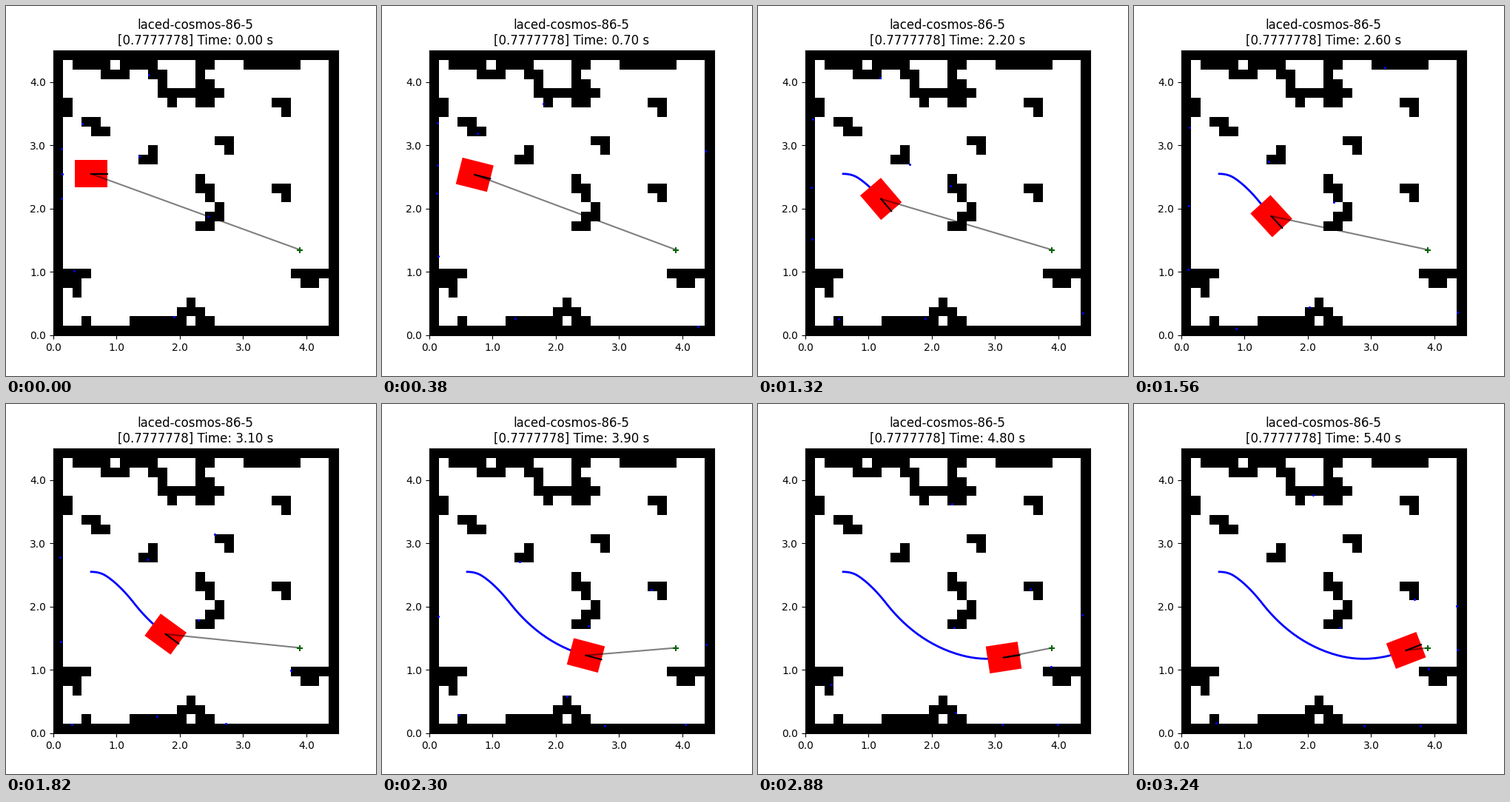
Animation, 500 px wide and 500 px high, one loop 3340 ms. Source, as a matplotlib script:

```python
import numpy as np
import matplotlib.pyplot as plt
from matplotlib.animation import FuncAnimation
from matplotlib.patches import Rectangle

N, CELL = 30, 0.15
SIZE = N * CELL
DT, STEPS = 0.1, 54
TICK, TICKS = 20, 167
START, GOAL = (0.6, 2.55), (3.9, 1.35)
LENGTH, WIDTH = 0.508, 0.43

MOVES = {"R": (1, 0), "L": (-1, 0), "U": (0, 1), "D": (0, -1)}
HOOK = "RD"
# Each obstacle is traced cell by cell from a start column and row
WALKS = [
    (2, 28, "RRRDRRURRRDRDDRRRRRR"), (12, 24, ""),
    (16, 28, "LDDDDRUU"), (20, 28, "RRRRR"),
    (23, 24, HOOK), (17, 20, HOOK), (23, 15, HOOK),
    (1, 24, "D"), (3, 22, "RDR"), (9, 18, "RU"),
    (15, 16, "DRD"), (17, 13, "DLDL"),
    (3, 6, "LLDRD"), (25, 6, "RRRLDL"),
    (3, 1, ""), (8, 1, "RRRRRURUDRDR"),
]


def build_grid():
    grid = np.ones((N, N), bool)
    grid[1:-1, 1:-1] = False
    for col, row, walk in WALKS:
        grid[row, col] = True
        for step in walk:
            dx, dy = MOVES[step]
            col, row = col + dx, row + dy
            grid[row, col] = True
    return grid


def ease(t, start, end):
    """Mostly linear ramp from 0 to 1 with slightly softened ends."""
    u = np.clip((t - start) / (end - start), 0, 1)
    return 0.7 * u + 0.3 * u * u * (3 - 2 * u)


def lag(t, start, tau):
    """First-order response to a step at the start time."""
    return 1 - np.exp(-np.maximum(t - start, 0) / tau)


def drive(sub=20):
    """Integrate speed along the heading and sample once per step."""
    h = DT / sub
    t = np.arange(STEPS * sub + 1) * h
    heading = -52 * ease(t, 0, 2.35) + 73 * ease(t, 2.35, 5.4)
    speed = 0.172 + 0.818 * lag(t, 1.35, 0.5) - 0.268 * lag(t, 3.85, 0.11)
    a = np.radians(heading)

    def integrate(v, origin):
        return origin + np.append(0, np.cumsum((v[1:] + v[:-1]) * h / 2))

    x = integrate(speed * np.cos(a), START[0])
    y = integrate(speed * np.sin(a), START[1])
    return x[::sub], y[::sub], heading[::sub]


grid = build_grid()
xs, ys, headings = drive()
reach = np.arange(0.01, 6.5, 0.05)
beams = np.arange(180, -180, -40)


def scan(x, y, heading):
    """March each beam until it lands in a blocked cell."""
    a = np.radians(heading + beams)[:, None]
    px, py = x + reach * np.cos(a), y + reach * np.sin(a)
    col = np.clip((px / CELL).astype(int), 0, N - 1)
    row = np.clip((py / CELL).astype(int), 0, N - 1)
    hit = grid[row, col].argmax(axis=1)
    i = np.arange(len(beams))
    return px[i, hit], py[i, hit]


fig, ax = plt.subplots(figsize=(5, 5), dpi=100)
ax.imshow(grid, cmap="binary", vmin=0, vmax=1, origin="lower",
          extent=(0, SIZE, 0, SIZE), interpolation="nearest")
ax.set_xticks(range(5))
ax.set_yticks(range(5))
ax.xaxis.set_major_formatter("{x:.1f}")
ax.yaxis.set_major_formatter("{x:.1f}")

path, = ax.plot([], [], "b", lw=2, zorder=2)
robot = Rectangle((0, 0), LENGTH, WIDTH, rotation_point="center",
                  fc="r", ec="none", zorder=3)
ax.add_patch(robot)
aim, = ax.plot([], [], "k", alpha=0.5, zorder=4)
nose, = ax.plot([], [], "k", zorder=4)
ax.scatter(*GOAL, s=36, c="darkgreen", marker="+", zorder=5)
dots, = ax.plot([], [], "b.", ms=2.5, zorder=6)
title = ax.set_title("")


def update(tick):
    # Steps alternate between one and five ticks on screen
    i = min(2 * (tick // 6) + (tick % 6 > 0), STEPS)
    x, y, heading = xs[i], ys[i], headings[i]
    a = np.radians(heading)
    path.set_data(xs[:i + 1], ys[:i + 1])
    robot.set_xy((x - LENGTH / 2, y - WIDTH / 2))
    robot.angle = heading
    aim.set_data([x, GOAL[0]], [y, GOAL[1]])
    nose.set_data([x, x + LENGTH / 2 * np.cos(a)],
                  [y, y + LENGTH / 2 * np.sin(a)])
    dots.set_data(*scan(x, y, heading))
    title.set_text(f"laced-cosmos-86-5\n[0.7777778] Time: {i * DT:.2f} s")
    return path, robot, aim, nose, dots, title


anim = FuncAnimation(fig, update, frames=TICKS, interval=TICK,
                     repeat=True, repeat_delay=0, blit=False)
plt.show()
```
